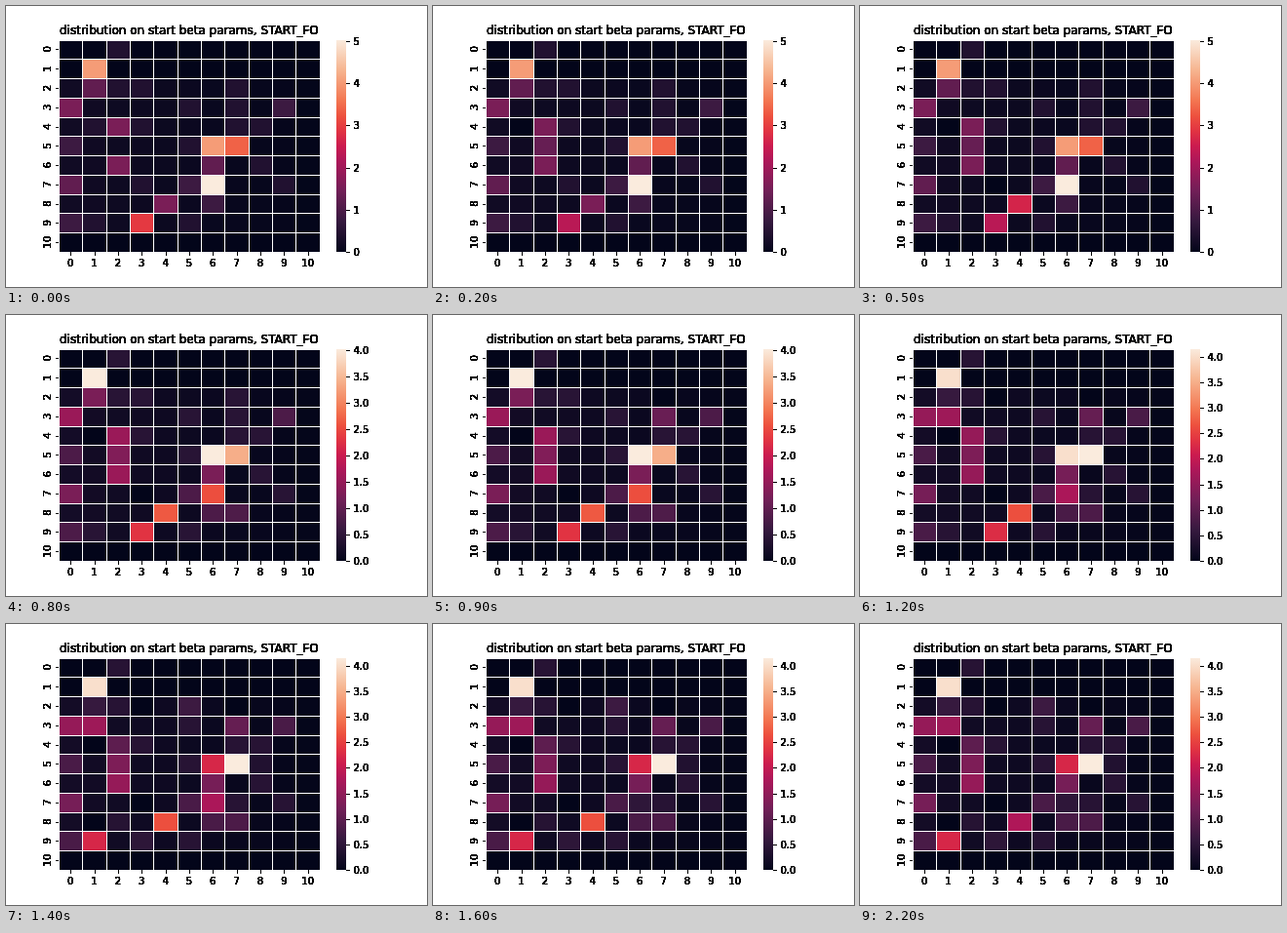
These frames come from a looping animation (432x288 px, 3600 ms). An HTML page with a canvas:

```html
<!DOCTYPE html>
<html lang="en">
<head>
<meta charset="utf-8">
<title>Heatmap</title>
<style>
  html, body { margin: 0; width: 100%; height: 100%; overflow: hidden; background: #fff; }
  canvas { display: block; }
</style>
</head>
<body>
<canvas id="stage" width="432" height="288"></canvas>
<script>
const ctx = document.getElementById('stage').getContext('2d');
const LOOP = 3600, N = 11;
const LEFT = 54, TOP = 34.56, BOTTOM = 252;
const CELL_W = 267.84 / N, CELL_H = (BOTTOM - TOP) / N;
const BAR = { x: 339, w: 10 };

// Colour ramp: position, hex
const RAMP = [
  [0, '03051a'], [1 / 7, '35193e'], [2 / 7, '701f57'], [3 / 7, 'ad1759'],
  [0.5, 'cb1b4f'], [4 / 7, 'e13342'], [0.64, 'ed503e'], [5 / 7, 'f37651'],
  [6 / 7, 'f6b48f'], [1, 'faebdd']
].map(([p, hex]) => [p, [0, 2, 4].map(i => parseInt(hex.slice(i, i + 2), 16))]);

// Starting weights; a cell is named by its row and column digits
const LEVELS = [
  [5.03, '76'],
  [4.03, '11 56'],
  [3.4, '57'],
  [2.95, '93'],
  [1.55, '30 42 62 84'],
  [1.25, '21 66 70'],
  [0.8, '39 50 75 86 90'],
  [0.43, '02 22 23 27 35 37 41 43 47 48 55 68 73 79 91 95']
];

// Weight passes between cells: time, from, to, amount ('' is outside the grid)
const MOVES = [
  [100, '93', '52', 0.65],
  [200, '41', '52', 0.5],
  [500, '73', '84', 1.1],
  [800, '76', '87', 0.75],
  [800, '76', '', 1.72],
  [900, '27', '37', 0.65],
  [1000, '23', '57', 0.76],
  [1200, '21', '31', 0.65],
  [1200, '76', '31', 0.8],
  [1200, '', '77', 0.35],
  [1400, '56', '91', 1.8],
  [1400, '42', '25', 0.55],
  [1400, '93', '58', 0.3],
  [1400, '93', '', 1.5],
  [1400, '81', '82', 0.25],
  [1600, '76', '', 1.25],
  [2200, '84', '', 0.85]
];

const colX = c => LEFT + c * CELL_W;
const rowY = r => TOP + r * CELL_H;
const rgb = c => `rgb(${c.map(Math.round).join()})`;

function rampColor(v) {
  const i = Math.max(1, RAMP.findIndex(([p]) => p >= v));
  const [p0, a] = RAMP[i - 1], [p1, b] = RAMP[i];
  const k = (v - p0) / (p1 - p0);
  return rgb(a.map((n, j) => n + (b[j] - n) * k));
}

function rect(x, y, w, h, color) {
  ctx.fillStyle = color;
  ctx.fillRect(x, y, w, h);
}

// Repeated passes harden the antialiased edges
function label(str, x, y, size = 10, align = 'center', turn = 0) {
  ctx.save();
  ctx.translate(x, y);
  ctx.rotate(turn);
  ctx.font = `${size}px "DejaVu Sans", sans-serif`;
  ctx.textAlign = align;
  ctx.fillStyle = '#000';
  for (let i = 0; i < 12; i++) ctx.fillText(str, 0, 0);
  ctx.restore();
}

// Faint background, fading to the right
const faint = (r, c) => r > 1 && r < 10 ? Math.max(0, 0.2 - 0.018 * c) : 0;

function cellsAt(t) {
  const cells = Array.from({ length: N }, (_, r) =>
    Array.from({ length: N }, (_, c) => faint(r, c)));
  for (const [v, names] of LEVELS) {
    for (const [r, c] of names.split(' ')) cells[r][c] = v;
  }
  const add = ([r, c], v) => {
    if (r) cells[r][c] = Math.max(0, cells[r][c] + v);
  };
  for (const [at, from, to, amount] of MOVES) {
    if (at > t) break;
    add(from, -amount);
    add(to, amount);
  }
  return cells;
}

function drawGrid(cells, max) {
  cells.forEach((row, r) => row.forEach((v, c) => {
    const x = Math.round(colX(c)) + 1, y = Math.round(rowY(r)) + 1;
    rect(x, y, Math.round(colX(c + 1)) - x, Math.round(rowY(r + 1)) - y,
      rampColor(v / max));
  }));
}

function drawAxes() {
  for (let i = 0; i < N; i++) {
    const x = colX(i + 0.5), y = rowY(i + 0.5);
    rect(Math.round(x), BOTTOM, 1, 4, '#000');
    rect(51, Math.round(y), 3, 1, '#000');
    label(i, x, 267);
    label(i, 46, y, 10, 'center', -Math.PI / 2);
  }
  label('distribution on start beta params, START_FO', 187.9, 29, 12);
}

function drawBar(max) {
  const top = Math.round(TOP);
  const g = ctx.createLinearGradient(0, BOTTOM, 0, top);
  RAMP.forEach(([p, c]) => g.addColorStop(p, rgb(c)));
  rect(BAR.x, top, BAR.w, BOTTOM - top, g);
  const step = max > 4.5 ? 1 : 0.5;
  for (let v = 0; v <= max; v += step) {
    const y = Math.round(BOTTOM - v / max * (BOTTOM - TOP));
    rect(BAR.x + BAR.w, y, 4, 1, '#000');
    label(v.toFixed(step < 1 ? 1 : 0), 356.4, y + 4, 10, 'left');
  }
}

function frame() {
  const cells = cellsAt(performance.now() % LOOP);
  const max = Math.max(...cells.flat());
  rect(0, 0, 432, 288, '#fff');
  drawGrid(cells, max);
  drawAxes();
  drawBar(max);
  requestAnimationFrame(frame);
}
frame();
</script>
</body>
</html>
```
